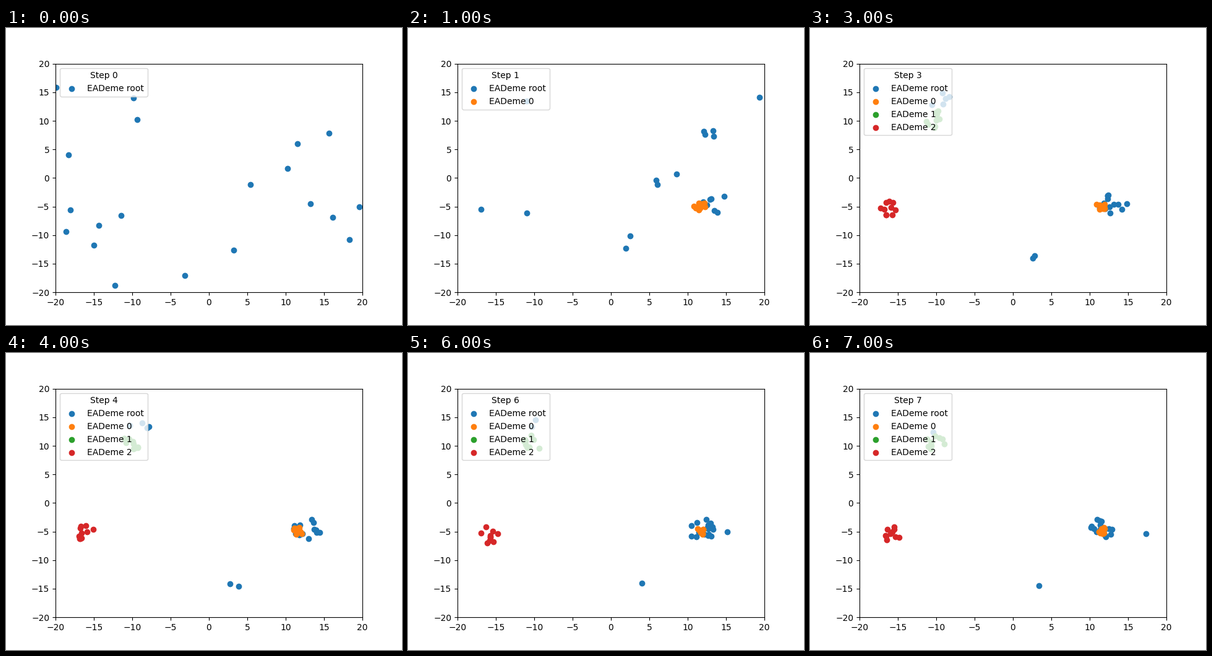
A matplotlib script that plays this animation: 640 by 480 pixels, repeating every 8000 ms.

```python
import numpy as np
import matplotlib.pyplot as plt
from matplotlib.animation import FuncAnimation

STEPS = 8
ROOT_SIZE = 20
CHILD_SIZE = 10

# Scattered root individuals, outside any niche, by step.
STRAYS = {
    0: [(-19.92, 15.84), (-9.84, 14), (-9.35, 10.22), (-18.31, 4.05),
        (-18.06, -5.58), (-18.63, -9.37), (-14.35, -8.29), (-11.45, -6.56),
        (-15, -11.75), (-12.26, -18.79), (-3.15, -17.06), (3.23, -12.62),
        (5.4, -1.15), (10.24, 1.67), (11.53, 6), (15.65, 7.84),
        (13.23, -4.5), (16.13, -6.88), (19.6, -5.04), (18.31, -10.78)],
    1: [(19.35, 14.11), (8.55, 0.69), (5.89, -0.39), (6.05, -1.15),
        (-16.94, -5.48), (-10.97, -6.13), (2.5, -10.13), (1.94, -12.29)],
    2: [(-19.92, 15.41), (-19.19, 16.06), (11.05, 3.83), (10.4, 1.23),
        (4.92, -1.47), (-17.66, -5.15), (-16.77, -8.61)],
    5: [(-15.73, -7.53)],
    6: [(15.16, -5)],
    7: [(17.34, -5.37)],
}


def cloud(rng, n, centre, radii):
    """n random points spread evenly over an ellipse."""
    angle = rng.uniform(0, 2 * np.pi, n)
    reach = np.sqrt(rng.uniform(0, 1, n))
    unit = np.column_stack([np.cos(angle), np.sin(angle)])
    return np.array(centre) + unit * reach[:, None] * radii


def root_deme(step, rng):
    strays = np.reshape(STRAYS.get(step, []), (-1, 2))
    north_west = 8 - step if step > 1 else step
    north_east = 4 if step == 1 else 0
    south = 0 if step < 2 else 2 if step < 6 else 1
    east = ROOT_SIZE - len(strays) - north_west - north_east - south
    return np.vstack([
        strays,
        cloud(rng, north_west, (-9.3, 13.6), (1.7, 1.8)),
        cloud(rng, north_east, (12.5, 7.5), (1.4, 1.0)),
        cloud(rng, south, (3.3, -14.0), (0.9, 0.9)),
        cloud(rng, east, (13.7 - 0.3 * step, -4.5), (2.1, 1.8)),
    ])


def child_demes(step, rng):
    """One child starts at each of steps 1 to 3, then slowly contracts."""
    shapes = [
        ((11.55, -4.9), (0.95 - 0.06 * step, 0.75)),
        ((-10.2, 10.5), (1.3, 2.0 - 0.1 * step)),
        ((-16.3 + 0.12 * (step - 3), -5.3), (1.2, 1.7)),
    ]
    return [cloud(rng, CHILD_SIZE, *shape) for shape in shapes[:step]]


fig, ax = plt.subplots(figsize=(6.4, 4.8), dpi=100)


def draw(step):
    rng = np.random.default_rng(step)
    ax.clear()
    ax.set_xlim(-20, 20)
    ax.set_ylim(-20, 20)
    ax.scatter(*root_deme(step, rng).T, label="EADeme root")
    for i, points in enumerate(child_demes(step, rng)):
        ax.scatter(*points.T, label=f"EADeme {i}")
    ax.legend(title=f"Step {step}", loc="upper left")
    return ax.get_children()


anim = FuncAnimation(fig, draw, frames=STEPS, interval=1000,
                     repeat=True, repeat_delay=0)
plt.show()
```
